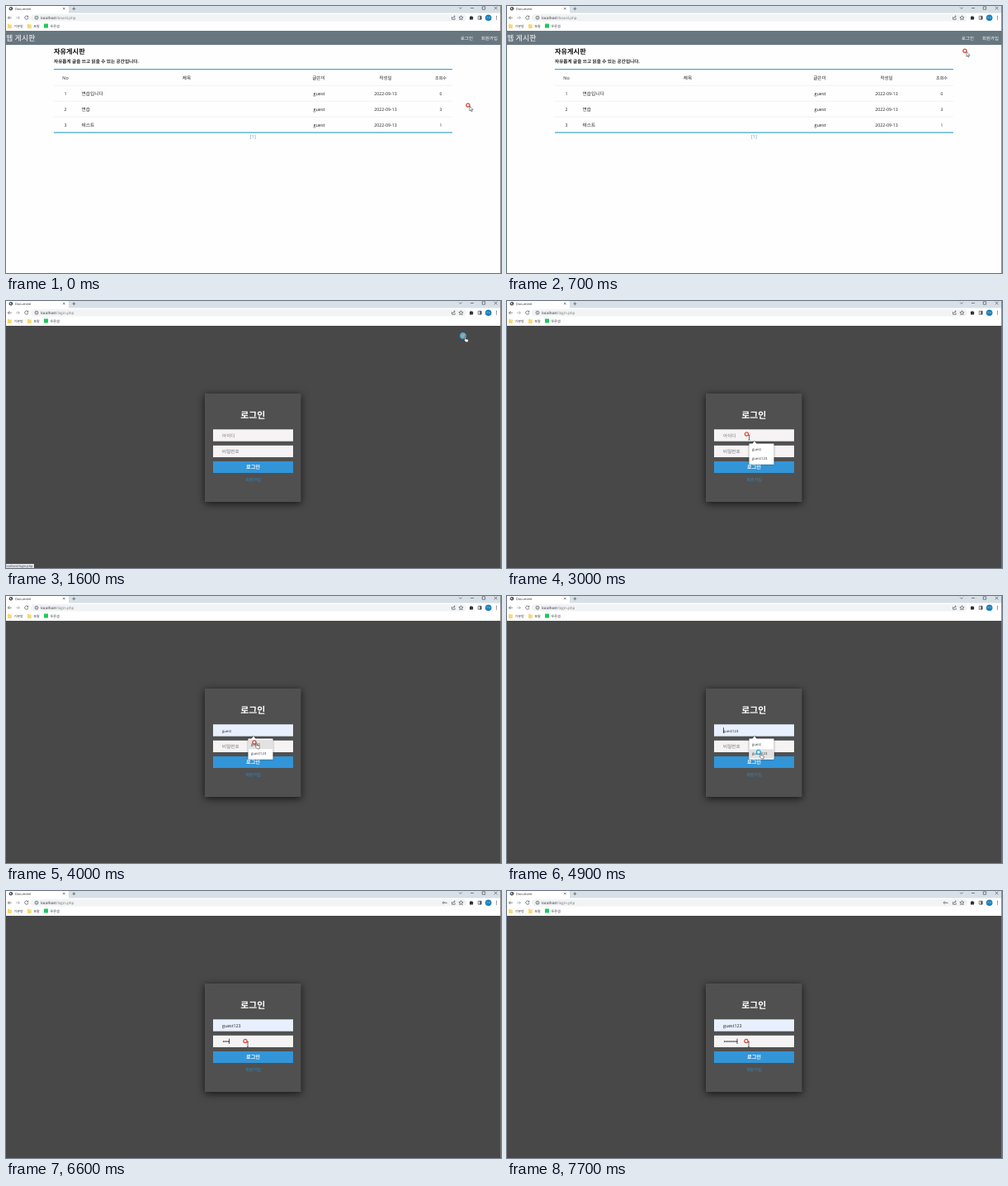
Recreate the animation shown at these times as an HTML page. Size 600 by 323 pixels, loop 8000 ms.

```html
<!DOCTYPE html>
<html lang="ko">
<head>
<meta charset="utf-8">
<title>Document</title>
<style>
  html, body { margin: 0; width: 100%; height: 100%; overflow: hidden; }
  svg { display: block; }
  text {
    font-family: "Open Sans", "Noto Sans CJK KR", sans-serif;
    text-rendering: geometricPrecision;
    white-space: pre;
  }
  .mid { text-anchor: middle; }
  .bold { font-weight: 700; }
  .line { fill: none; stroke: #50545a; stroke-width: .7; }
</style>
</head>
<body>
<svg id="stage" width="600" height="323" viewBox="0 0 600 323"></svg>
<script>
const LOOP = 8000;
const stage = document.getElementById('stage');

const text = (x, y, size, str, fill = '#222', cls = '', id = '') =>
  `<text x="${x}" y="${y}" font-size="${size}" fill="${fill}" class="${cls}" id="${id}">${str}</text>`;
const mid = (x, y, size, str, fill, cls = '') => text(x, y, size, str, fill, 'mid ' + cls);
const rect = (x, y, w, h, fill, extra = '') =>
  `<rect x="${x}" y="${y}" width="${w}" height="${h}" fill="${fill}" ${extra}/>`;
const line = (d, extra = '') => `<path class="line" d="${d}" ${extra}/>`;
const folder = x => `<path d="M${x} 21.8h1.8l.7.7h2.3v4.4h-4.8z" fill="#f8d775"/>`;

const browser = () => `
  ${rect(0, 0, 600, 9, '#d7e0e6')}
  <path d="M0 9V0H74.5Q76 0 76 2V9z" fill="#fff"/>
  ${rect(0, 8.5, 600, 21.5, '#fff')}
  <circle cx="6" cy="3.3" r="2.3" fill="#45494d"/>
  <path d="M4.6 2.2l1.6.4.2 1-1 .6zM6.6 4.2l1 .1-.6.9z" fill="#fff"/>
  ${text(11, 4.8, 4, 'Document', '#333')}
  ${line('M69 1.8l2.6 2.6m0-2.6l-2.6 2.6M80.3 3.3h4m-2-2v4')}
  ${line('M549.2 1.6l1.7 1.7 1.7-1.7M563 2.5h4M577.3.8h3.4v3.4h-3.4zM591.8.7l3.6 3.6m0-3.6l-3.6 3.6')}
  ${line('M6.8 14.2H2.4m2-2l-2 2 2 2')}
  ${line('M12 14.2h4.4m-2-2l2 2-2 2', 'opacity=".55"')}
  ${line('M26.4 12.7a2.1 2.1 0 1 0 .5 1.7M26.9 11.6v1.6h-1.6')}
  ${rect(30, 10, 528, 8.6, '#f1f3f4', 'rx="4.3"')}
  <circle class="line" cx="37" cy="14.2" r="2"/>
  ${line('M37 13.9v1.4M37 12.9v.5')}
  <text x="42" y="15.8" font-size="4.5" fill="#222">localhost<tspan id="path" fill="#777"></tspan></text>
  <g id="key">${line('M531.6 14.2h2.5v1')}<circle cx="530.3" cy="14.2" r="1.1" class="line"/></g>
  ${line('M540.6 13v3.2h3.6v-1.6M541.8 14.8q.3-2 2.2-2.2m-1-1.1l1.2 1.1-1.2 1.2')}
  ${line('M551.5 11.7l.8 1.7 1.8.2-1.4 1.2.4 1.8-1.6-.9-1.6.9.4-1.8-1.4-1.2 1.8-.2z')}
  <path d="M562 12.7h1.3q.5-1.9 1.3 0H566v1.4q1.3.5 0 1.2v1.2h-4z" fill="#303338"/>
  ${line('M572.3 12.2h3.8v4h-3.8z')}${rect(574.3, 12.2, 2, 4, '#50545a')}
  <circle cx="584.7" cy="14.2" r="3.8" fill="#197fb8"/>
  ${mid(584.7, 15.3, 2.8, '가나', '#d8ecf5')}
  ${[12.3, 14.2, 16.1].map(y => `<circle cx="594.5" cy="${y}" r=".6" fill="#50545a"/>`).join('')}
  ${folder(2)}${text(9.5, 25.8, 4.1, '기본방', '#444')}
  ${folder(26)}${text(33.3, 25.8, 4.1, '포탈', '#444')}
  ${rect(46, 21.5, 5, 5, '#1ec95c')}${text(53.5, 25.8, 4.1, '푸른샘', '#444')}`;

const row = ([no, title, views], i) => {
  const y = 107.6 + 19 * i;
  return mid(72, y, 5.3, no) + text(91.5, y, 5.7, title) + mid(379.5, y, 5.5, 'guest') +
    mid(460, y, 5.3, '2022-09-13') + mid(527, y, 5, views) +
    rect(58, 95.8 + 19 * i, 483, .6, '#e9e9e9');
};

const board = () => `<g id="board">
  ${rect(0, 30, 600, 293, '#fefefe')}
  ${rect(0, 30, 600, 17, '#68767f')}
  <g id="hover">${rect(546, 30, 25.5, 17, '#59514f')}</g>
  ${text(0, 41.8, 9, '웹 게시판', '#fff')}
  ${mid(558.5, 40.6, 5.4, '로그인', '#fff')}
  ${mid(586, 40.6, 5.4, '회원가입', '#fff')}
  ${text(58, 58, 8.2, '자유게시판', '#111', 'bold')}
  ${text(58, 68.7, 5.6, '자유롭게 글을 쓰고 읽을 수 있는 공간입니다.', '#222', 'bold')}
  ${mid(72, 88.8, 5.4, 'No')}${mid(219, 88.8, 5.6, '제목')}${mid(379, 88.8, 5.7, '글쓴이')}
  ${mid(460, 88.8, 5.5, '작성일')}${mid(527, 88.6, 5.1, '조회수')}
  ${[['1', '연습입니다', '0'], ['2', '연습', '3'], ['3', '테스트', '1']].map(row).join('')}
  ${rect(58, 76, 483, 1.2, '#3ba7cc')}${rect(58, 152.5, 483, 1.2, '#3ba7cc')}
  ${mid(299.3, 160.2, 5.6, '[1]', '#4b9fd5')}
</g>`;

const login = () => `<g id="login">
  ${rect(0, 30, 600, 293, '#484848')}
  ${rect(241, 112, 116.5, 131, '#505050', 'style="filter:drop-shadow(0 2px 5px #000b)"')}
  ${mid(299.3, 141.8, 10.9, '로그인', '#fff', 'bold')}
  ${rect(251, 155.3, 97, 14.4, '#f5f3f4', 'id="idBox"')}
  ${rect(251, 174.8, 97, 14.2, '#f5f3f4')}
  ${text(262, 164.6, 5.6, '아이디', '#777', '', 'idText')}
  ${text(262, 184, 5.6, '비밀번호', '#777', '', 'pwHint')}
  <g id="dots">${Array.from({ length: 8 }, (_, i) =>
    `<circle cx="${263.7 + 2.08 * i}" cy="182.1" r=".8" fill="#222"/>`).join('')}</g>
  ${rect(0, 0, .7, 6.4, '#111', 'id="caret"')}
  ${rect(251, 194, 97, 14, '#3295d8')}
  ${mid(299.5, 203.3, 6.2, '로그인', '#fff', 'bold')}
  ${mid(299.5, 217.8, 5.1, '회원가입', '#3488bd')}
  <g id="popup">
    <path d="M293.5 172.5h4l2.5-2.8 2.5 2.8h21v25.3h-30z" fill="#fff"
      style="filter:drop-shadow(0 .7px 1px #0007)"/>
    ${rect(293.5, 174, 30, 11, '#e2e2e2', 'id="option"')}
    ${text(297, 181, 4.3, 'guest', '#333')}${text(297, 192.3, 4.3, 'guest123', '#333')}
  </g>
</g>`;

const pointer = () => `<g id="pointer">
  <circle id="ring" fill="#ffffff80"/>
  <path id="arrow" d="M0 0v6l1.4-1.2.9 2 .9-.4-.9-1.9h1.9z" fill="#fff" stroke="#222" stroke-width=".5"/>
  <path id="hand" d="M.6 0q.7 0 .7.7v2.2l2.6.6q.7.2.5 1.2L4 6.8H1.4L-.8 4.3q.4-.7.9-.2V.7q0-.7.5-.7z"
    fill="#fff" stroke="#222" stroke-width=".5"/>
  <path id="beam" d="M-.1 0q1.1 0 1.1.6Q1 0 2.1 0M1 .4v5.3M-.1 6.1Q1 6.1 1 5.5 1 6.1 2.1 6.1"
    fill="none" stroke="#333" stroke-width=".7"/>
</g>`;

stage.innerHTML = browser() + board() + login() +
  `<g id="status">${rect(0, 318, 34, 5, '#dcdfe3')}${text(-1.6, 322, 3.8, 'localhost/login.php', '#555')}</g>` +
  rect(599.2, 0, .8, 323, '#777') + pointer();

const $ = id => document.getElementById(id);
const show = (id, on) => { $(id).style.display = on ? '' : 'none'; };
const set = (id, attrs) => {
  for (const name in attrs) $(id).setAttribute(name, attrs[name]);
};

// Pointer stops: time, x, y
const route = [
  [0, 560, 120], [100, 560, 120], [900, 554, 42], [1600, 554, 42], [2300, 290.5, 161],
  [3000, 290.5, 161], [3500, 301, 177], [4400, 301, 177], [4800, 305, 189],
  [4900, 305, 189], [5100, 361, 154], [5200, 291, 179], [5300, 290, 181.5], [LOOP, 290, 181.5]
];
const clicks = [1500, 2400, 4900, 5400];
const keystrokes = [6000, 6200, 6500, 6600, 6800, 7300, 7500, 7700];

function position(t) {
  const i = route.findIndex(stop => stop[0] > t);
  const [t0, x0, y0] = route[i - 1], [t1, x1, y1] = route[i];
  const p = (t - t0) / (t1 - t0), k = p * p * (3 - 2 * p);
  return [x0 + (x1 - x0) * k, y0 + (y1 - y0) * k];
}

function drawPointer(t) {
  const [x, y] = position(t);
  set('pointer', { transform: `translate(${x + 2} ${y + 1})` });
  const hand = (t >= 800 && t < 1700) || (t >= 3200 && t < 5000);
  const beam = !hand && ((t >= 2200 && t < 5000) || t >= 5200);
  show('hand', hand);
  show('beam', beam);
  show('arrow', !hand && !beam);
  const start = clicks.find(c => t >= c && t < c + 400);
  const age = t - start;
  set('ring', {
    cx: -2, cy: -1,
    r: start ? 2.5 + age / 140 : 2.1,
    stroke: start ? '#35aee0' : '#dc4a3c',
    'stroke-width': start ? 1.3 + age / 600 : 1.3
  });
}

function drawForm(t) {
  const preview = t >= 4000 && t < 5000, chosen = t >= 5000, filled = preview || chosen;
  set('idBox', { fill: filled ? '#e8f0fe' : '#f5f3f4' });
  set('idText', { fill: filled ? '#1c1c1c' : '#777', 'font-size': preview ? 4.3 : chosen ? 5.3 : 5.6 });
  $('idText').textContent = !filled ? '아이디' : t < 4600 ? 'guest' : 'guest123';

  show('popup', t >= 2600 && t < 5000);
  show('option', t >= 3400);
  set('option', { y: t < 4600 ? 174 : 185.3 });

  const typed = keystrokes.filter(k => t >= k).length;
  [...$('dots').children].forEach((dot, i) => { dot.style.display = i < typed ? '' : 'none'; });
  show('pwHint', !typed);
  show('key', typed);

  const inPassword = t >= 5400;
  set('caret', { x: 262 + (inPassword ? 2.08 * typed : 0), y: inPassword ? 178.6 : 159.2 });
  show('caret', inPassword || (t >= 2500 && Math.floor(t / 500) % 2 === 1));
}

function draw(now) {
  const t = Math.floor(now % LOOP / 100) * 100;
  const onBoard = t < 1600;
  show('board', onBoard);
  show('login', !onBoard);
  show('hover', t >= 800);
  show('status', t >= 900 && t < 2200);
  $('path').textContent = onBoard ? '/board.php' : '/login.php';
  drawForm(t);
  drawPointer(t);
}

const begin = performance.now();
function tick() {
  draw(performance.now() - begin);
  requestAnimationFrame(tick);
}
tick();
</script>
</body>
</html>
```
